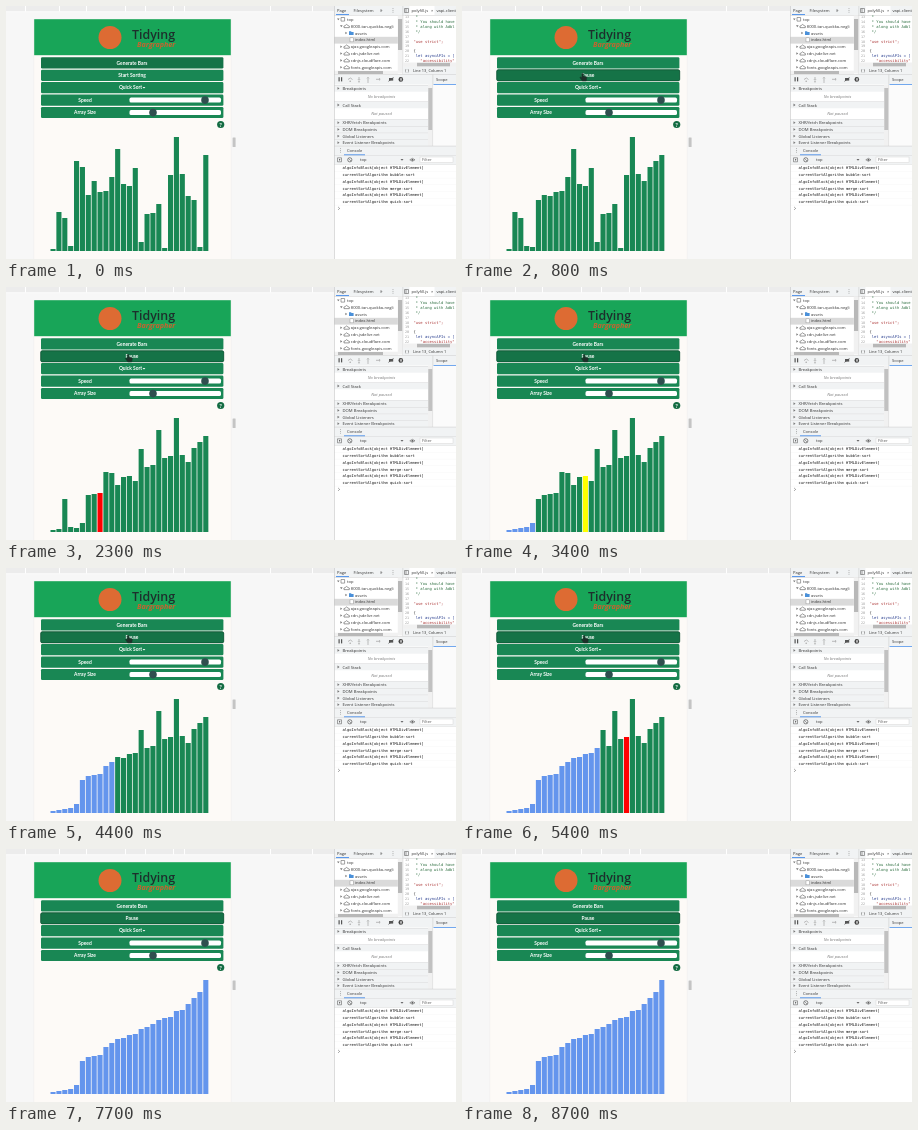
These frames come from a looping animation (450x253 px, 8.8 s). An HTML page:

```html
<!DOCTYPE html>
<html lang="en">
<head>
<meta charset="utf-8">
<title>Sort demo</title>
<style>
html, body { margin: 0; width: 100%; height: 100%; overflow: hidden; background: #f7f7f7; }
svg { display: block; width: 100vw; height: 100vh; }
text { white-space: pre; }
.ui { font-family: "Open Sans", sans-serif; }
.mono { font-family: "DejaVu Sans Mono", monospace; }
.btn { font-family: Lato, sans-serif; font-weight: 700; text-anchor: middle; }
.mid { text-anchor: middle; }
</style>
</head>
<body>
<svg id="stage" viewBox="0 0 450 253"></svg>
<script>
const LOOP = 8800, STEP = 100, N = 27;
const GREEN = '#198754', DARK = '#157347', BLUE = '#6495ed', RED = '#ff0000', YELLOW = '#ffff00';
const BASE = 245, LEFT = 44.5, PITCH = 5.875;

const rect = (x, y, w, h, fill, more = '') =>
  `<rect x="${x}" y="${y}" width="${w}" height="${h}" fill="${fill}" ${more}/>`;
const text = (x, y, str, size = 4.1, fill = '#333', cls = 'ui', more = '') =>
  `<text x="${x}" y="${y}" font-size="${size}" fill="${fill}" class="${cls}" ${more}>${str}</text>`;
const circle = (x, y, r, fill, more = '') =>
  `<circle cx="${x}" cy="${y}" r="${r}" fill="${fill}" ${more}/>`;
const path = (d, fill, more = '') => `<path d="${d}" fill="${fill}" ${more}/>`;
const stroke = (d, color = '#666', w = 0.6) =>
  path(d, 'none', `stroke="${color}" stroke-width="${w}"`);
const label = (y, str, x = 126) => text(x, y + 1.7, str, 4.9, '#fff', 'btn');

function viewport() {
  let s = rect(0, 0, 328, 253, '#f7f7f7') + rect(0, 0, 328, 5.5, '#ececec');
  for (const x of [19, 53, 80, 119, 139, 167, 178, 264, 306]) s += rect(x, 0, 1, 5.5, '#fff');
  s += rect(0, 5.5, 328, 0.6, '#fff');
  s += rect(27.5, 13, 198, 240, '#f1f0ef') + rect(28.2, 13, 196.6, 240, '#fdfaf7');
  s += rect(28.2, 13.2, 196.6, 36, '#18a558');
  s += circle(104, 31.5, 11.5, '#dd6b33');
  s += text(126, 32.5, 'Tidying', 12.4, '#1d2f2c', 'ui', 'font-weight="600"');
  s += text(131, 41, 'Bargrapher', 7.2, '#c8622f', 'ui', 'font-weight="700" font-style="italic"');
  for (let i = 0; i < 5; i++) {
    s += rect(35, 51.3 + i * 12.4, 182.4, 11.2, GREEN, `rx="1.3" ${i ? '' : 'id="first"'}`);
  }
  s += label(56.9, 'Generate Bars') + label(81.7, 'Quick Sort', 124.5);
  s += path('M136.6 80.9h2.8l-1.4 1.5z', '#fff');
  [['Speed', 94.1, 199], ['Array Size', 106.6, 147]].forEach(([name, y, x]) => {
    s += label(y, name, 79);
    s += rect(123.5, y - 2.5, 91.5, 5, '#fff', 'rx="1.6"') + circle(x, y, 3.8, '#2f4f4f');
  });
  s += circle(214.7, 118.5, 3.6, '#146c43') + text(214.7, 120.5, '?', 5.8, '#fff', 'btn');
  s += rect(226.6, 131.5, 3, 9.5, '#c4c4c4', 'rx=".5"');
  return s;
}

function sources() {
  let s = rect(328, 0, 122, 253, '#fff') + rect(328, 0, 122, 9, '#f1f3f4');
  s += rect(403.5, 0, 25, 9, '#fff');
  s += text(331, 5.8, 'Page') + text(347.5, 5.8, 'Filesystem') + text(374, 5.8, '»', 5);
  s += text(384.5, 5.8, '⋮', 5) + text(405.5, 5.8, 'polyfill.js') + text(425, 5.8, '×', 4) + text(430.5, 5.8, 'vapi-client');
  s += rect(330, 8.3, 13, 0.8, '#1a73e8') + rect(328, 9, 122, 0.5, '#ccc');
  s += stroke('M398.5 2.5h4v4h-4zM400 2.5v4');
  s += rect(328, 30.8, 64, 6.8, '#dadada');
  const rows = ['top', '8000-tan-quokka-negli', 'assets', 'index.html', 'ajax.googleapis.com',
    'cdn.jsdelivr.net', 'cdnjs.cloudflare.com', 'fonts.googleapis.com'];
  rows.forEach((name, i) => {
    const y = 13.3 + i * 6.85, deep = i === 2 || i === 3;
    const x = i === 0 ? 335 : deep ? 343 : 338;
    if (i !== 3) {
      s += path(i < 2 ? `M${x - 4} ${y - 0.8}h2.6l-1.3 1.8z` : `M${x - 3.6} ${y - 1.3}v2.6l1.8-1.3z`, '#777');
    }
    s += i === 0 ? stroke(`M${x} ${y - 1.8}h3.6v3.6h-3.6z`)
      : i === 2 ? path(`M${x} ${y - 1.8}h2l.6.8h2v3h-4.6z`, '#4a90d9')
      : i === 3 ? rect(x + 1, y - 2, 3.2, 4, '#fff', 'stroke="#888" stroke-width=".4"')
      : stroke(`M${x} ${y + 1.5}q-.8-2 1.2-2.1q1.2-2.2 2.9 0q2 .2 1.2 2.1z`, '#555');
    s += text(i === 0 ? 341 : deep ? 349 : 344.8, y + 1.5, name);
  });
  s += rect(391.8, 9.5, 4.6, 58, '#f1f1f1') + rect(392, 13, 4.2, 31, '#b8b8b8');
  s += rect(328, 64.7, 64, 3.6, '#f1f1f1') + rect(332, 65, 45, 3, '#b8b8b8');
  s += rect(396.6, 0, 0.6, 68.5, '#ccc');

  const code = [
    ['#2c6e3f', ' *'], ['#2c6e3f', ' * You should have'], ['#2c6e3f', ' * along with Adbl'], ['#2c6e3f', ' */'],
    ['', ''], ['#a33', '"use strict";'], ['', ''], ['#333', '{'], ['#2a3f8f', ' let asyncAPIs = ['], ['#a33', '   "accessibility"']
  ];
  code.forEach(([color, line], i) => {
    const y = 12 + i * 4.9;
    s += text(399, y, 13 + i, 3.4, '#999', 'mono') + text(407.5, y, line, 3.8, color, 'mono');
  });
  s += rect(397.2, 56.5, 53, 4.4, '#f1f1f1') + rect(411, 56.8, 33, 3.6, '#b8b8b8');
  s += rect(397.2, 60.9, 53, 8, '#f1f3f4') + text(399, 66.3, '{ }', 4) + text(407, 66.3, 'Line 13, Column 1', 4);
  return s;
}

function header(y, name) {
  return rect(328, y, 94, 6.7, '#f1f3f4') + rect(328, y, 94, 0.4, '#d0d0d0') +
    path(`M331.5 ${y + 2}v2.8l2-1.4z`, '#777') + text(336.5, y + 4.9, name, 4.2);
}

function debuggerPane() {
  let s = rect(328, 68.5, 122, 10, '#f1f3f4') + rect(328, 68.3, 122, 0.5, '#ccc');
  s += rect(332.5, 71.2, 1.2, 4.2, '#555') + rect(335, 71.2, 1.2, 4.2, '#555');
  s += stroke('M342 73.5q2.5-3 4.5 0M353 71v3M352 73.3l1 1 1-1M362 75v-3.5M361 72.3l1-1 1 1M370 73.3h4M373 72.2l1.2 1.1-1.2 1.1', '#aaa', 0.8);
  s += circle(344.2, 75.3, 0.8, '#aaa') + circle(353, 75.8, 0.8, '#aaa') + circle(362, 76, 0.7, '#aaa');
  s += stroke('M382.5 75.3l5-3.8', '#444', 0.8) + rect(383, 72, 4.2, 2.6, '#555') + circle(394.8, 73.4, 2.3, '#444');
  s += rect(394, 72.2, 0.6, 2.4, '#fff') + rect(395.2, 72.2, 0.6, 2.4, '#fff');
  s += text(430, 75.4, 'Scope') + rect(427.5, 78, 22.5, 0.6, '#1a73e8');
  s += header(79, 'Breakpoints') + header(95.6, 'Call Stack') + header(113.3, 'XHR/fetch Breakpoints');
  s += header(120, 'DOM Breakpoints') + header(126.7, 'Global Listeners') + header(133.3, 'Event Listener Breakpoints');
  s += text(375.5, 92.4, 'No breakpoints', 4.1, '#777', 'ui mid', 'font-style="italic"');
  s += text(375.5, 109.3, 'Not paused', 4.1, '#777', 'ui mid', 'font-style="italic"');
  s += rect(422, 78.5, 4.6, 61.5, '#f1f1f1') + rect(422.3, 82, 4, 42, '#c1c1c1');
  s += rect(426.6, 68.5, 0.6, 71.5, '#ccc') + rect(427.2, 79, 22.8, 61, '#fbfbfb');
  return s;
}

function consolePane() {
  let s = rect(328, 140, 122, 18.3, '#f1f3f4') + rect(328, 139.8, 122, 0.5, '#c5c5c5');
  s += text(332, 146.4, '⋮', 5) + text(341, 146.3, 'Console') + rect(338, 148.5, 21, 0.8, '#1a73e8');
  s += rect(328, 149.2, 122, 0.4, '#d0d0d0') + rect(328, 158, 122, 0.4, '#d0d0d0');
  s += stroke('M331.5 151.8h4v4h-4z') + path('M333 152.8v2l1.5-1z', '#555');
  s += circle(343.8, 153.8, 2.1, 'none', 'stroke="#555" stroke-width=".7"') + stroke('M342.4 152.4l2.8 2.8');
  s += text(354, 155.4, 'top') + path('M394.5 153h3l-1.5 1.8z', '#666');
  s += stroke('M403.8 153.8q2.6-3 5.2 0q-2.6 3-5.2 0z') + circle(406.4, 153.8, 0.9, '#555');
  s += rect(414, 151, 33, 5.6, '#fff', 'stroke="#ccc" stroke-width=".4"') + text(416, 155.3, 'Filter', 4.1, '#555');
  ['bubble', 'merge', 'quick'].forEach((name, i) => {
    const y = 163.2 + i * 13.5;
    s += text(336.5, y, 'algoInfoBlock[object HTMLDivElement]', 3.75, '#111', 'mono');
    s += text(336.5, y + 6.8, `currentSortAlgorithm ${name}-sort`, 3.75, '#111', 'mono');
    s += rect(328, y + 2, 122, 0.3, '#f0f0f0') + rect(328, y + 8.7, 122, 0.3, '#f0f0f0');
  });
  s += stroke('M332.2 201l1.4 1.4-1.4 1.4', '#555', 0.6) + rect(328, 0, 0.6, 253, '#c5c5c5');
  return s;
}

const stage = document.getElementById('stage');
stage.innerHTML = viewport() + sources() + debuggerPane() + consolePane() +
  '<g id="idle">' + label(69.3, 'Start Sorting') + '</g><g id="busy">' +
  rect(34.7, 63.8, 183, 11, DARK, 'rx="1.5" stroke="#0f5132" stroke-width=".8"') +
  label(69.3, 'Pause') + '</g><g id="bars">' +
  Array.from({ length: N }, (_, i) => rect(LEFT + i * PITCH, 0, 5.1, 0, GREEN)).join('') +
  '</g><g id="hand">' +
  path('M-1.7-3.8q.8-.8 1.6 0v2.4l2.8.6q.8.2.6 1.2l-.6 3h-3.9l-2.5-3.4q.4-1 2 .2z', '#1f2f2a', 'stroke="#0d3d27" stroke-width=".5"') + '</g>';

const [first, idle, busy, hand] = ['first', 'idle', 'busy', 'hand'].map(id => document.getElementById(id));
const bars = [...document.getElementById('bars').children];

// Bar tops from shortest to tallest; every order below holds ranks into it.
const tops = [243, 242, 241, 240, 236, 212, 208, 207, 206, 198, 194, 190, 189, 186,
  185, 180, 178, 175, 171, 169, 168, 162, 161, 155, 149, 143, 131];
const range = n => Array.from({ length: n }, (_, i) => i);
const shuffled = [0, 8, 5, 3, 23, 22, 12, 17, 13, 14, 18, 25, 16, 15, 21, 4, 6, 7, 9, 1, 19, 26, 20, 11, 10, 2, 24];

function swap(a, [i, j]) {
  [a[i], a[j]] = [a[j], a[i]];
}

// Moves ranks below the pivot to the left and returns the swaps made.
function partition(a, lo, hi, pivot) {
  const made = [];
  while (true) {
    while (lo < hi && a[lo] < pivot) lo++;
    while (lo < hi && a[hi] >= pivot) hi--;
    if (lo >= hi) return made;
    made.push([lo, hi]);
    swap(a, [lo, hi]);
  }
}

const split = shuffled.slice();
const coarse = partition(split, 0, 26, 15);
const fine = [...partition(split, 0, 14, 9), ...partition(split, 0, 8, 8)];
const swaps = [...coarse, ...fine];

const leftDone = [...range(11), 12, 11, 13, 14, ...split.slice(15)];
const almost = [...range(21), 26, 25, 21, 22, 23, 24];
const phases = [
  { start: 2300, end: 4400, from: 0, to: 11, a: split, b: leftDone },
  { start: 4400, end: 6400, from: 11, to: 21, a: leftDone, b: almost },
  { start: 6400, end: 7300, from: 21, to: N, a: almost, b: range(N) }
];
const marks = [RED, RED, null, RED, YELLOW, RED];

function stateAt(t) {
  if (t < 2300) {
    const count = t < 1300 ? Math.max(0, t - 500) / 100 : coarse.length + Math.floor((t - 1300) / 200);
    const order = shuffled.slice();
    const made = swaps.slice(0, count);
    made.forEach(pair => swap(order, pair));
    const last = t > 800 ? made[made.length - 1][0] : -1;
    return { order, done: 0, mark: last, color: RED };
  }
  const ph = phases.find(p => t < p.end);
  if (!ph) return { order: range(N), done: N };
  const pos = Math.floor(ph.from + (ph.to - ph.from) * (t - ph.start) / (ph.end - ph.start));
  const order = ph.a.slice();
  for (let i = 0; i < pos; i++) swap(order, [i, order.indexOf(ph.b[i])]);
  const step = t / STEP;
  return { order, done: pos, mark: pos + (2 * step + 6) % 11, color: marks[step % 6] };
}

function draw(time) {
  const t = Math.floor(time % LOOP / STEP) * STEP;
  const { order, done, mark, color } = stateAt(t);
  bars.forEach((bar, i) => {
    const y = tops[order[i]];
    bar.setAttribute('y', y);
    bar.setAttribute('height', BASE - y);
    bar.setAttribute('fill', i === mark && color ? color : i < done ? BLUE : GREEN);
  });
  const running = t >= 600;
  first.setAttribute('fill', t < 300 ? DARK : GREEN);
  idle.style.display = running ? 'none' : '';
  busy.style.display = running ? '' : 'none';
  hand.style.display = t >= 400 && t < 7400 ? '' : 'none';
  hand.setAttribute('transform', `translate(${t < 1000 ? 121.5 : 123} 71.5)`);
}

const begin = performance.now();
function tick() {
  draw(performance.now() - begin);
  requestAnimationFrame(tick);
}
tick();
</script>
</body>
</html>
```
